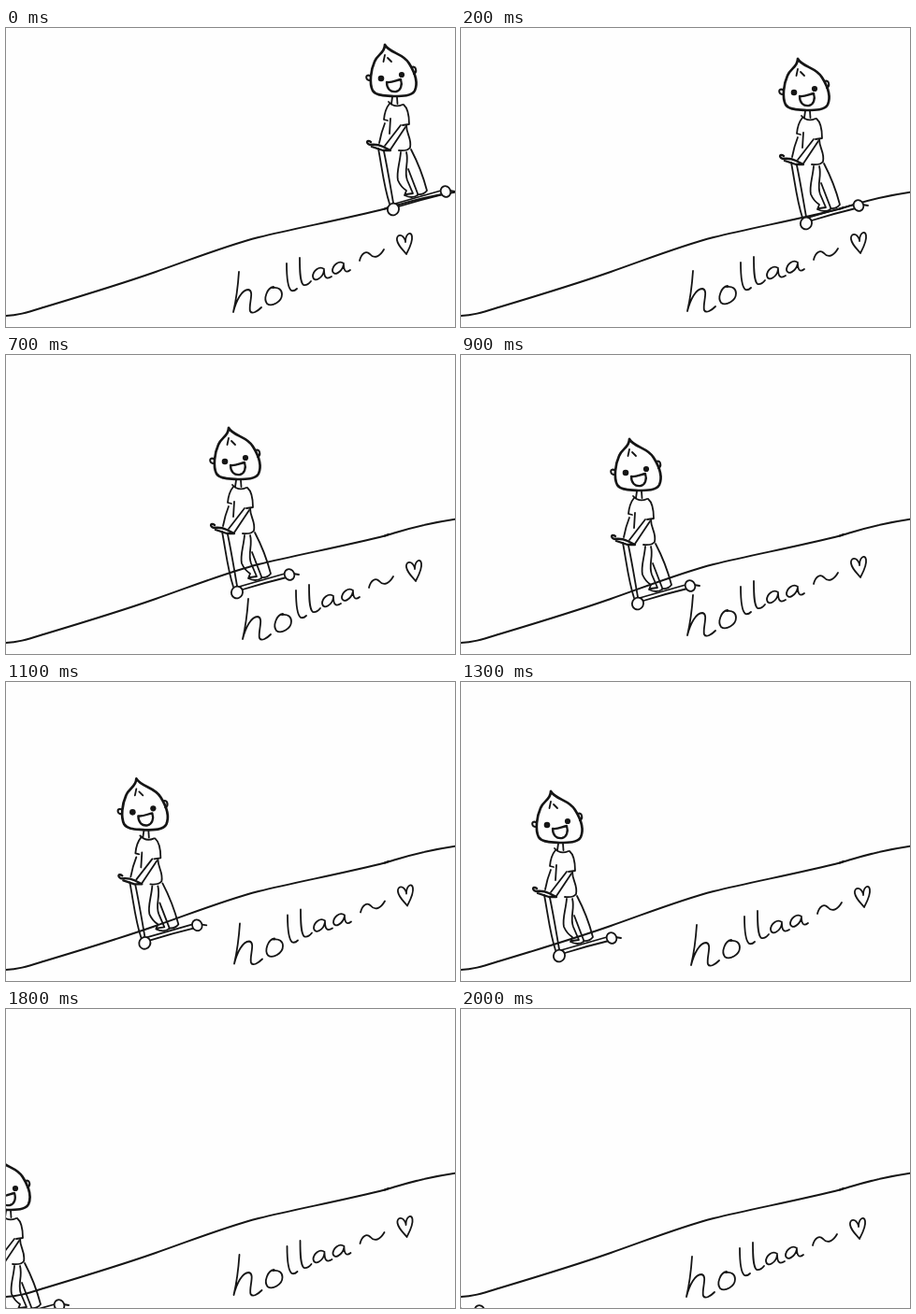
Write an HTML page that moves like this. It is 480x320 px and loops after 2.1 s.

```html
<!DOCTYPE html>
<html lang="en">
<head>
<meta charset="utf-8">
<title>Scooter ride</title>
<style>
html, body { margin: 0; width: 100%; height: 100%; overflow: hidden; background: #fefefe; }
svg { display: block; width: 480px; height: 320px; fill: none; stroke: #151515; stroke-width: 1.8; stroke-linecap: round; stroke-linejoin: round; }
.wheel { fill: #fefefe; }
.eye { fill: #151515; stroke: none; }
</style>
</head>
<body>
<svg viewBox="0 0 480 320">
  <path stroke-width="2" d="M-2 308C12 308 24 304 40 299C80 287 120 275 160 261C200 247 235 233 270 224C310 214 360 205 407 193C425 188 438 182 482 175.500"/>
  <path stroke-width="2.400" d="M405 193.500L409 192"/>

  <g id="greeting">
    <path d="M249 261C248 276 246 291 243 304C246 292 252 280 259 280C266 281 259 296 261 303C263 307 269 303 273 299"/>
    <path d="M286 277C279 278 275 290 279 295C284 299 295 293 295 285C295 280 291 277 285 278"/>
    <path d="M300 252C300 263 301 278 305 281Q308 282 311 279M314 246C314 258 314 272 318 275Q322 276 326 271"/>
    <path d="M340 258C335 254 328 260 328 266C329 273 339 268 340 259C340 266 342 270 348 266"/>
    <path d="M361 252C356 248 349 254 349 260C350 266 359 262 361 253C361 259 363 263 368 259"/>
    <path d="M378 249C380 241 385 238 389 242C394 248 400 244 404 237"/>
    <path d="M427 228C424 219 417 221 418 227C419 233 424 237 428 242C431 236 435 229 434 223C433 217 427 220 427 229"/>
  </g>

  <g id="rider">
    <g stroke-width="2.700">
      <path d="M405 18C405 27 397 28 394 36C390 45 388 59 392 67C396 73 406 72 414 73C424 73 434 73 437 67C441 58 436 46 431 38C425 27 410 27 405 18Z"/>
      <path stroke-width="2.300" d="M407 58C412 59 417 56 422 55C424 61 422 67 417 68C411 69 407 65 407 58Z"/>
    </g>
    <path d="M405 29L403.500 36M408 32L412 36"/>
    <path stroke-width="2.100" d="M389 51C384 49 384 56 389 56M434 42C438 40 440 47 436 49"/>
    <circle class="eye" cx="401" cy="54" r="3.300"/>
    <circle class="eye" cx="423" cy="50" r="3.100"/>

    <path d="M413 74L412 81M418 74L418.500 81M409 79Q415 86 424 82"/>
    <path d="M410 81Q405 87 404 98L408 99M425 82Q431 87 431 103L424 104M411 97L410 113"/>
    <path d="M428 104C428 114 434 118 432 128Q429 132 420 131M405 102Q401 112 399 123"/>
    <path d="M427 106L411 130M422 104L405 126"/>
    <path stroke-width="2.300" d="M390 122C386 119 384 123 389 125Q397 124 403 127L411 131L403 131L391 127"/>

    <path d="M398 129C402 150 404 170 410 188M404 132C408 151 411 170 414 187"/>
    <path d="M422 133C421 145 417 155 419 163Q422 170 428 174L426 179Q434 183 440 179M428 133C431 144 425 153 429 163L435 177L428 178"/>
    <path d="M433 130Q444 151 450 174Q446 179 440 178M430 151L440 177"/>
    <path d="M416 188L465 174M420 191Q442 184 467 178"/>
    <path d="M474 174L480 175"/>
    <ellipse class="wheel" cx="414" cy="194" rx="6" ry="6.500" transform="rotate(25 414 194)"/>
    <ellipse class="wheel" cx="470" cy="175" rx="5.200" ry="6" transform="rotate(-25 470 175)"/>
  </g>
</svg>
<script>
const STEP = 100, STEPS = 21;

// [step, x, y] offsets from the starting pose
const ride = [
  [0, 0, 0], [4, -90, 30], [6, -141, 46], [7, -167, 60], [9, -225, 72],
  [12, -286, 92], [13, -309, 99], [16, -374, 125], [18, -413, 142], [20, -450, 148]
];
const wobble = [
  [0, 0, 0], [4, -2, -2], [7, 10, 0], [9, -1, -4], [13, 3, -1], [16, 3, 0], [20, -2, 4]
];

function place(id, keys, step) {
  const next = Math.max(1, keys.findIndex(k => k[0] >= step));
  const a = keys[next - 1], b = keys[next];
  const u = (step - a[0]) / (b[0] - a[0]);
  const mix = i => a[i] + (b[i] - a[i]) * u;
  document.getElementById(id).setAttribute("transform", `translate(${mix(1)} ${mix(2)})`);
}

function draw() {
  const step = Math.floor(performance.now() / STEP) % STEPS;
  place("rider", ride, step);
  place("greeting", wobble, step);
  requestAnimationFrame(draw);
}
draw();
</script>
</body>
</html>
```
